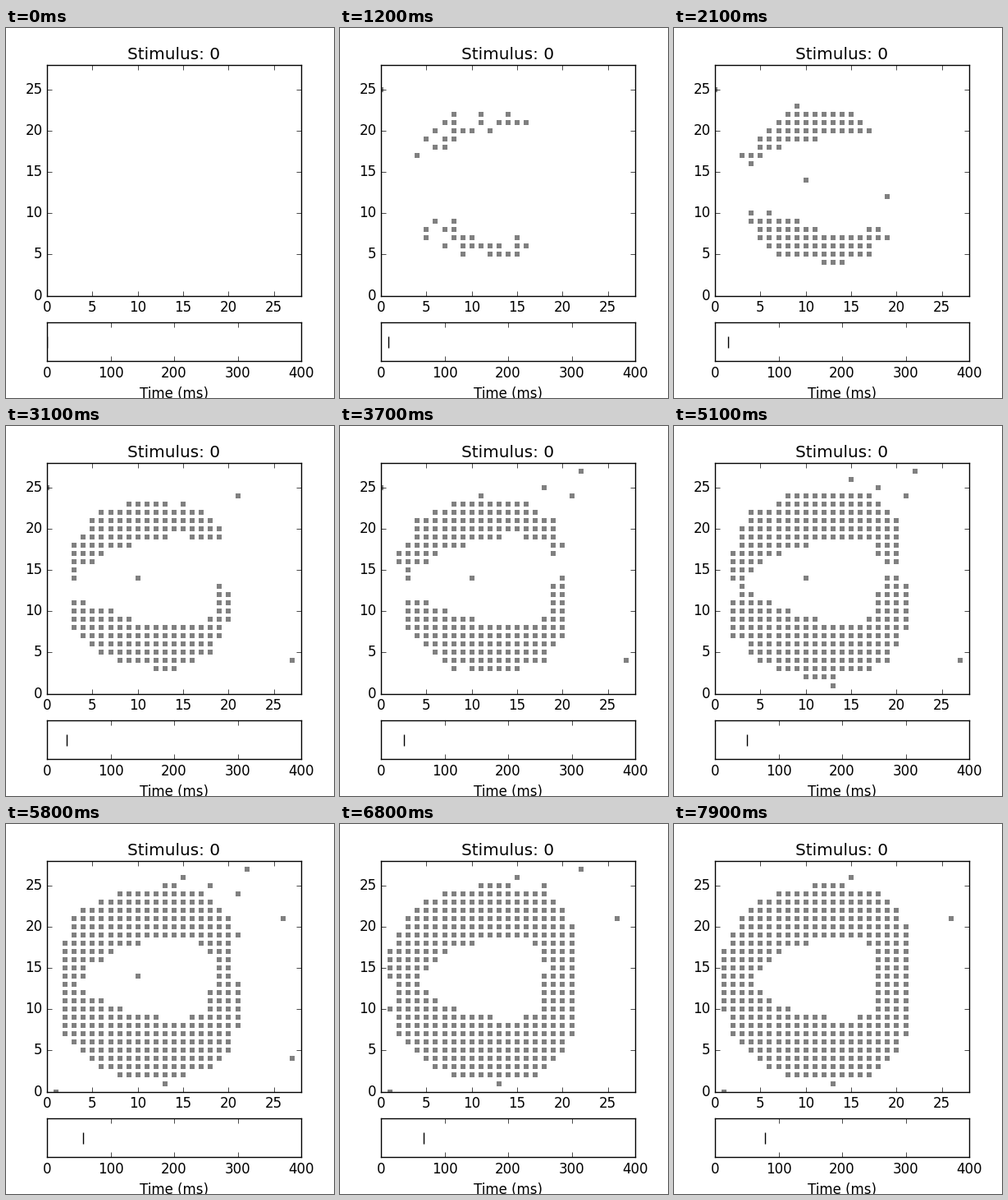
A matplotlib script that plays this animation: 400x450 px, repeating every 8 s.

```python
import math
import random

import matplotlib.pyplot as plt
from matplotlib.animation import FuncAnimation
from matplotlib.gridspec import GridSpec

plt.style.use("classic")
plt.rcParams["font.family"] = "DejaVu Sans"

FRAMES = 80
STEP = 100  # ms per frame, one simulated millisecond each
LIFE = 40   # how long a lone spike stays visible

# Lone spikes outside the ring: column, row, time
LONE = [
    (0, 25, 1), (10, 14, 20), (21, 24, 27), (27, 4, 28), (22, 27, 36),
    (18, 25, 36), (15, 26, 41), (13, 1, 42), (1, 0, 52), (26, 21, 55),
]


def outer_level(x, y):
    """Below 1 inside the rounded outline of the ring."""
    v = abs(y - 13.2) / 11.8
    u = abs(x - 11.15 - 1.3 * v ** 2) / 10.5
    return (u ** 2.5 + v ** 2.5) ** 0.4


def hole_level(x, y):
    """Below 1 inside the hole, whose ends lean to the right."""
    v = abs(y - 13.7) / 4.8
    u = abs(x - 11.2 - 3 * min(v, 1) ** 2) / 6.4
    return math.hypot(u, v)


def first_spike(x, y, edge, rng):
    """The middle of the band fires first, its rims and flanks last."""
    rim = max(edge - 0.62, 0) / 0.38
    seam = 12.5 + 0.16 * (x - 2)
    flank = math.exp(-((y - seam) / 2) ** 2)
    on = 10 + 50 * rim ** 2 + 25 * flank + rng.gauss(0, 4)
    return min(max(round(on), 6), 74)


def spike_times():
    """List of (column, row, on, off) for every cell."""
    rng = random.Random(7)
    spikes = [(x, y, on, on + LIFE) for x, y, on in LONE]
    for y in range(28):
        for x in range(28):
            outer, hole = outer_level(x, y), hole_level(x, y)
            if outer <= 1.01 and hole > 1:
                on = first_spike(x, y, max(outer, 1 / hole), rng)
                spikes.append((x, y, on, FRAMES))
    return spikes


SPIKES = spike_times()

fig = plt.figure(figsize=(4, 4.5), dpi=100, facecolor="white")
grid = GridSpec(2, 1, height_ratios=[6, 1])

field = fig.add_subplot(grid[0])
field.set_title("Stimulus: 0")
field.set_xlim(0, 28)
field.set_ylim(0, 28)
field.set_xticks(range(0, 28, 5))
field.set_yticks(range(0, 28, 5))
dots, = field.plot([], [], "s", color="0.5", ms=20 ** 0.5, mec="none", mew=0)

clock = fig.add_subplot(grid[1])
clock.set_xlim(0, 400)
clock.set_ylim(0, 1)
clock.set_xticks(range(0, 401, 100))
clock.set_yticks([])
clock.set_xlabel("Time (ms)")
hand, = clock.plot([], [], "|", color="black", ms=10, mew=1)


def draw(t):
    live = [(x, y) for x, y, on, off in SPIKES if on <= t < off]
    # tiny shift settles cells that fall on a half pixel
    dots.set_data([x + 0.005 for x, _ in live], [y for _, y in live])
    # the hand sits on the pixel below its exact place
    hand.set_data([t - 0.6], [0.5])
    return dots, hand


anim = FuncAnimation(fig, draw, frames=FRAMES, interval=STEP,
                     init_func=lambda: draw(0), repeat=True, repeat_delay=0)
plt.show()
```
